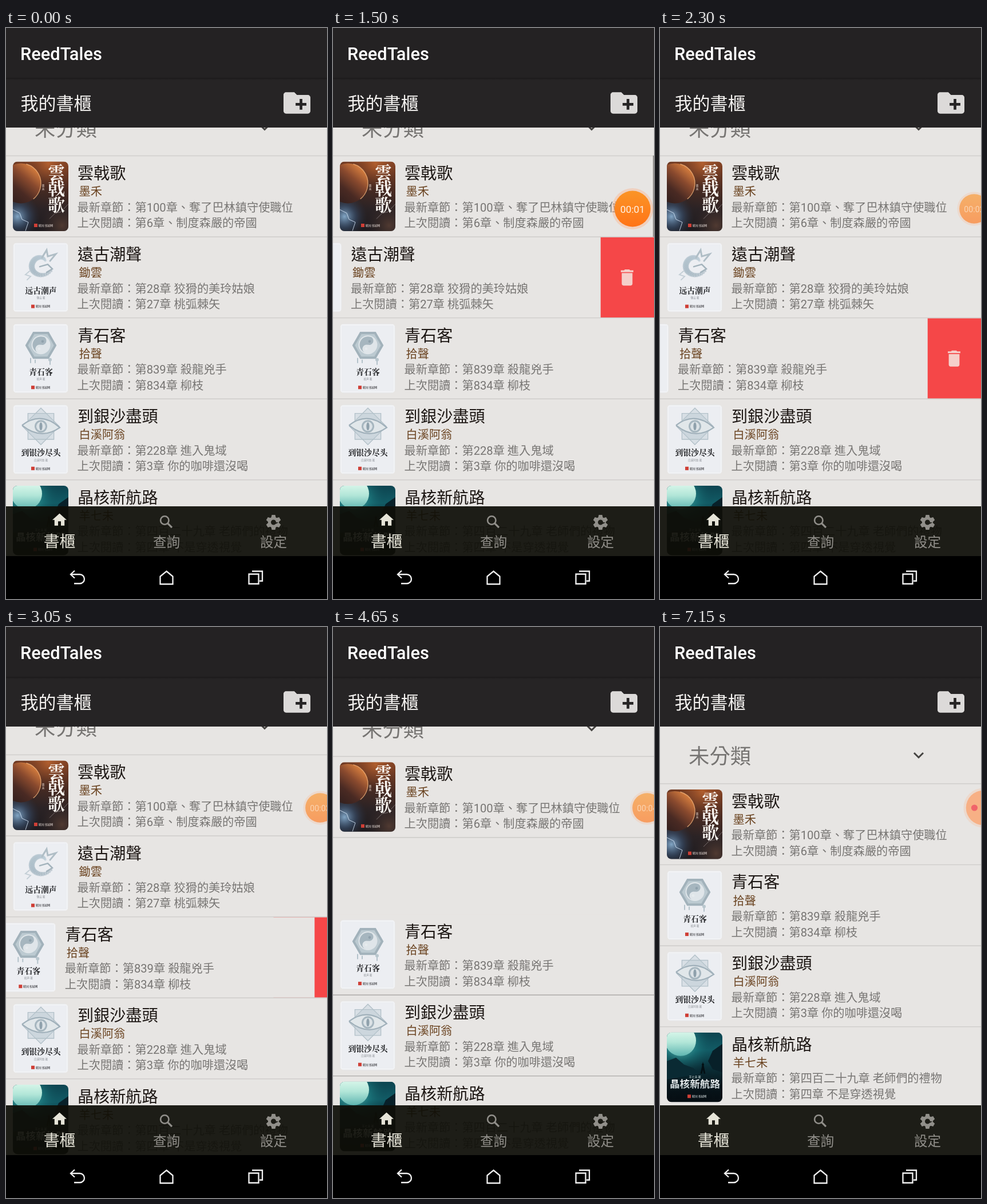
Write an HTML page with a canvas that moves like this. It is 561x998 px and loops after 7600 ms.

```html
<!DOCTYPE html>
<html lang="zh-Hant">
<head>
<meta charset="utf-8">
<title>ReedTales</title>
<style>
html, body { margin: 0; width: 100%; height: 100%; overflow: hidden; background: #000; }
canvas { display: block; width: 100%; height: 100%; }
</style>
</head>
<body>
<canvas id="stage" width="561" height="998"></canvas>
<script>
const ctx = document.getElementById('stage').getContext('2d');
const W = 561, LOOP = 7600, STEP = 50;
const LIST_TOP = 174, TABS_TOP = 836, TABS_END = 923;
const ROW_H = 141.6, OPEN_W = 93.5, SCROLL = 50.5;
const BG = '#e7e5e3', LINE = '#cfcdcb';
const SANS = 'Roboto, "Noto Sans CJK TC", "Noto Sans CJK JP", "Noto Sans CJK SC", sans-serif';
const SERIF = '"Noto Serif CJK SC", "Noto Serif CJK JP", "Noto Sans CJK SC", "Noto Sans CJK JP", serif';

const icons = {
  home: new Path2D('M10 20v-6h4v6h5v-8h3L12 3 2 12h3v8z'),
  trash: new Path2D('M6 19c0 1.1.9 2 2 2h8c1.1 0 2-.9 2-2V7H6zM19 4h-3.5l-1-1h-5l-1 1H5v2h14z'),
  folder: new Path2D('M20 6h-8l-2-2H4c-1.1 0-2 .9-2 2v12c0 1.1.9 2 2 2h16c1.1 0 2-.9 2-2V8c0-1.1-.9-2-2-2z' +
    'm-1 8h-3v3h-2v-3h-3v-2h3V9h2v3h3z')
};

const books = [
  { title: '雲戟歌', author: '墨禾', latest: '第100章、奪了巴林鎮守使職位', last: '第6章、制度森嚴的帝國', cover: planetCover },
  { title: '遠古潮聲', author: '鋤雲', latest: '第28章 狡猾的美玲姑娘', last: '第27章 桃弧棘矢',
    cover: () => paperCover('远古潮声', '锄云 著', swirl) },
  { title: '青石客', author: '拾聲', latest: '第839章 殺龍兇手', last: '第834章 柳枝',
    cover: () => paperCover('青石客', '拾声 著', hexagon) },
  { title: '到銀沙盡頭', author: '白溪阿翁', latest: '第228章 進入鬼域', last: '第3章 你的咖啡還沒喝',
    cover: () => paperCover('到银沙尽头', '白溪阿翁 著', starEye) },
  { title: '晶核新航路', author: '羊七未', latest: '第四百二十九章 老師們的禮物', last: '第四章 不是穿透視覺', cover: moonCover }
];

const ramp = (t, a, b) => Math.min(1, Math.max(0, (t - a) / (b - a)));
const ease = (t, a, b) => (1 - Math.cos(Math.PI * ramp(t, a, b))) / 2;
const mix = (a, b, k) => a + (b - a) * k;

// cy is the optical middle of the glyphs
function text(s, x, cy, size, color, opt = {}) {
  ctx.font = `${opt.weight || 400} ${size}px ${opt.font || SANS}`;
  ctx.textAlign = opt.align || 'left';
  ctx.fillStyle = color;
  ctx.fillText(s, x, cy + size * 0.37);
}
function rect(x, y, w, h, color) {
  ctx.fillStyle = color;
  ctx.fillRect(x, y, w, h);
}
function disc(x, y, r, color) {
  ctx.fillStyle = color;
  ctx.beginPath();
  ctx.arc(x, y, r, 0, 7);
  ctx.fill();
}
function poly(points, close) {
  ctx.beginPath();
  points.forEach(([x, y]) => ctx.lineTo(x, y));
  if (close) ctx.closePath();
}
function shape(points, color) {
  ctx.fillStyle = color;
  poly(points, true);
  ctx.fill();
}
function line(points, color, width, close) {
  ctx.strokeStyle = color;
  ctx.lineWidth = width;
  poly(points, close);
  ctx.stroke();
}
function gradient(stops, x0, y0, x1, y1) {
  const g = ctx.createLinearGradient(x0, y0, x1, y1);
  stops.forEach((c, i) => g.addColorStop(i / (stops.length - 1), c));
  return g;
}
function glow(x, y, r, stops) {
  const g = ctx.createRadialGradient(x, y, 0, x, y, r);
  stops.forEach((c, i) => g.addColorStop(i / (stops.length - 1), c));
  disc(x, y, r, g);
}
function icon(path, x, y, scale, color) {
  ctx.save();
  ctx.translate(x, y);
  ctx.scale(scale, scale);
  ctx.translate(-12, -12);
  ctx.fillStyle = color;
  ctx.fill(path, 'evenodd');
  ctx.restore();
}
function ring(n, r, turn = 0) {
  return Array.from({ length: n }, (_, i) => {
    const a = turn + i * 2 * Math.PI / n;
    return [r * Math.cos(a), r * Math.sin(a)];
  });
}

// Covers: 97 x 121.5, drawn from their top left corner
function badge(x, color) {
  rect(x, 108.5, 6, 6, '#cf3f36');
  text('晴川书屋网', x + 8, 111.5, 5, color, { weight: 700, font: SERIF });
}
function planetCover() {
  rect(0, 0, 97, 122, gradient(['#7d4024', '#4c2c22', '#2b2325', '#1e1b1f'], 60, 0, 40, 122));
  glow(62, 4, 40, ['rgba(200,108,50,.7)', 'rgba(150,76,40,0)']);
  glow(86, 112, 40, ['rgba(110,76,60,.6)', 'rgba(60,44,40,0)']);
  glow(8, 96, 40, ['rgba(140,180,214,.9)', 'rgba(66,100,140,.45)', 'rgba(40,50,70,0)']);
  disc(14, 38, 35, gradient(['#d9803f', '#8a4a2e', '#4a2a23', '#33201e'], 40, 12, -6, 66));
  ctx.strokeStyle = 'rgba(255,190,130,.7)';
  ctx.lineWidth = 1.4;
  ctx.beginPath();
  ctx.arc(14, 38, 35, -1.3, 0.9);
  ctx.stroke();
  line([[0, 84], [12, 90], [16, 101], [27, 106], [22, 121]], 'rgba(220,238,255,.8)', 1);
  line([[97, 74], [84, 88], [74, 90], [64, 100]], 'rgba(200,190,190,.45)', 1);
  [...'雲戟歌'].forEach((c, i) =>
    text(c, 76, 18 + i * 28.5, 30, '#fbf7f2', { weight: 900, font: SERIF, align: 'center' }));
  text('墨', 53, 42, 5, '#e8d8cc', { align: 'center' });
  text('禾', 53, 48, 5, '#e8d8cc', { align: 'center' });
  badge(37, '#d8cdc8');
}
function paperCover(title, author, art) {
  rect(0, 0, 97, 122, '#e5e6e8');
  rect(2, 2, 93, 117.5, '#eceef2');
  ctx.strokeStyle = '#f5f6f8';
  ctx.lineWidth = 1.5;
  ctx.strokeRect(2, 2, 93, 117.5);
  ctx.save();
  ctx.translate(49, 38);
  art();
  ctx.restore();
  text(title, 49, 84, 13.8, '#1f2023', { weight: 900, font: SERIF, align: 'center' });
  text(author, 49, 96.5, 4.6, '#8c9096', { align: 'center' });
  badge(32, '#3c3c40');
}
function swirl() {
  ctx.lineCap = 'round';
  for (let i = 0; i < 26; i++) {
    const k = i / 25, a = 0.6 + k * 5;
    disc(Math.cos(a) * (22 - 12 * k), Math.sin(a) * (19 - 7 * k) + 1, 2 + 3.4 * Math.sin(k * 3.1),
      `rgba(${158 + i},${176 + i},${187 + i},.55)`);
  }
  line([[2, -12], [10, -25], [12, -14], [26, -18], [16, -6]], '#b0bec6', 3);
  line([[-20, 12], [-27, 18], [-18, 21], [-24, 27]], '#c4cfd6', 2);
  line([[-2, 4], [12, 0], [20, 8], [10, 14]], '#a3b3bc', 2.5);
  ctx.lineCap = 'butt';
}
function hexagon() {
  shape(ring(6, 27), '#bccad1');
  line(ring(6, 25), '#a2b2bb', 4, true);
  disc(0, -1, 16.5, '#dfe5e9');
  ctx.fillStyle = '#a6b6bf';
  ctx.beginPath();
  ctx.arc(0, -1, 14.5, 1.9, 1.9 + Math.PI);
  ctx.arc(2.4, -8, 7.2, -1.25, 1.9);
  ctx.arc(-2.4, 6, 7.2, -1.25, 1.9, true);
  ctx.fill();
  disc(3, -7, 2.3, '#8fa1ac');
  disc(-3, 6, 2.3, '#e6ebee');
  [[-19, 22, 9], [-11, 25, 6], [15, 24, 10]].forEach(([x, y, h]) => rect(x, y, 2, h, '#b3c2ca'));
  disc(16, 25, 3, '#b9c7ce');
}
function starEye() {
  for (let i = 0; i < 2; i++) {
    const square = ring(4, 32, i * Math.PI / 4);
    shape(square, 'rgba(186,200,208,.4)');
    line(square, '#b3c1c9', 1.4, true);
  }
  ctx.beginPath();
  ctx.moveTo(-33, -2);
  ctx.quadraticCurveTo(0, -27, 33, 2);
  ctx.quadraticCurveTo(0, 25, -33, -2);
  ctx.fillStyle = '#e1e7ea';
  ctx.strokeStyle = '#a0b0ba';
  ctx.lineWidth = 2.2;
  ctx.fill();
  ctx.stroke();
  disc(0, 0, 11, '#a6b6bf');
  disc(0, 0, 8, '#dbe2e6');
  ctx.fillStyle = '#8fa1ac';
  ctx.beginPath();
  ctx.ellipse(0, 0, 2.6, 7, 0, 0, 7);
  ctx.fill();
}
function moonCover() {
  rect(0, 0, 97, 122, gradient(['#0d4450', '#125c66', '#0b2f38', '#07151b', '#060d12'], 50, 0, 50, 122));
  glow(24, 20, 60, ['rgba(150,240,220,.8)', 'rgba(40,150,150,.35)', 'rgba(10,60,70,0)']);
  disc(24, 14, 27, gradient(['#e4fbef', '#b2e6d8', '#5cb4b0'], 24, -8, 24, 42));
  shape([[97, 20], [80, 32], [72, 50], [80, 64], [97, 70]], '#082029');
  shape([[0, 50], [16, 44], [30, 56], [46, 62], [58, 72], [0, 82]], '#0a2a33');
  line([[60, 72], [63, 58], [66, 72]], '#041015', 3);
  disc(63, 56, 2, '#041015');
  text('羊七未 著', 49, 77, 5, '#d5e6e6', { align: 'center' });
  text('晶核新航路', 49, 89.5, 17.6, gradient(['#ffffff', '#b4c0c4'], 0, 80, 0, 100),
    { weight: 900, align: 'center' });
  badge(36, '#c9d2d4');
}

function drawRow(book, y, shift, alpha, dark) {
  ctx.save();
  ctx.globalAlpha = alpha;
  if (shift > 0) {
    rect(W - OPEN_W, y + 0.8, OPEN_W, ROW_H - 1.4, '#f54748');
    icon(icons.trash, 514, y + 71, 1.56, '#f5cfca');
  }
  rect(-shift, y + 0.8, W, ROW_H - 1.4, BG);
  ctx.save();
  ctx.translate(-shift, y);
  ctx.save();
  ctx.translate(12, 10);
  ctx.beginPath();
  ctx.roundRect(0, 0, 97, 121.5, 8);
  ctx.clip();
  book.cover();
  ctx.restore();
  text(book.title, 125, 30.5, 28.1, '#1c1613');
  text(book.author, 127.5, 62.5, 20.2, '#6a4320');
  text('最新章節：' + book.latest, 124.5, 90, 20.2, '#777573');
  text('上次閱讀：' + book.last, 124.5, 117.5, 20.2, '#777573');
  ctx.restore();
  rect(0, y + ROW_H - 0.8, W, 1.6, dark ? '#b0aeac' : LINE);
  ctx.restore();
}

function drawList(t) {
  const gone = ease(t, 4612, 4862);
  const fade = 1 - ramp(t, 4370, 4600);
  const first = ease(t, 1030, 1450) - ease(t, 1830, 2080) + ease(t, 3120, 3530);
  const second = ease(t, 1960, 2290) - ease(t, 2880, 3130);
  const dy = SCROLL * (gone - 1);
  const moving = gone > 0 && gone < 1;

  ctx.save();
  ctx.beginPath();
  ctx.rect(0, LIST_TOP, W, TABS_END - LIST_TOP);
  ctx.clip();
  rect(0, LIST_TOP, W, TABS_END - LIST_TOP, BG);
  text('未分類', 50, 225.8 + dy, 36.4, '#777573');
  line([[444, 220 + dy], [452, 228 + dy], [460, 220 + dy]], '#454341', 3);
  rect(0, 273.2 + dy, W, 1.6, LINE);
  books.forEach((book, i) => {
    if (i === 1 && fade === 0) return;
    const y = 274 + dy + i * ROW_H - (i > 1 ? ROW_H * gone : 0);
    const shift = i === 1 ? first : i === 2 ? second : 0;
    drawRow(book, y, shift * OPEN_W, i === 1 ? fade : 1, moving && i > 1);
  });
  const bar = ramp(t, 380, 550) * (1 - ramp(t, 1550, 1800));
  rect(559, 223, 2, 142, `rgba(120,118,116,${0.7 * bar})`);
  ctx.restore();
}

function drawHeader() {
  rect(0, 0, W, LIST_TOP, '#262425');
  rect(0, 0, W, 88, '#242223');
  rect(0, 87, W, 4, gradient(['#1b191a', '#262425'], 0, 87, 0, 91));
  text('ReedTales', 25, 44.6, 30.8, '#ffffff', { weight: 500 });
  text('我的書櫃', 25.5, 131.2, 31, '#f3f1ef');
  icon(icons.folder, 508.5, 131, 2.35, '#dcdad9');
}

function drawGear(x, y, color) {
  ctx.save();
  ctx.translate(x, y);
  for (let i = 0; i < 6; i++) {
    shape([[-4.4, -7], [-3, -13], [3, -13], [4.4, -7]], color);
    ctx.rotate(Math.PI / 3);
  }
  ctx.beginPath();
  ctx.arc(0, 0, 9.6, 0, 7);
  ctx.arc(0, 0, 4.5, 0, 7, true);
  ctx.fill('evenodd');
  ctx.restore();
}

function drawTabs() {
  const on = '#e6e4d8', off = '#918f8a';
  rect(0, TABS_TOP, W, TABS_END - TABS_TOP, 'rgba(14,14,8,.93)');
  icon(icons.home, 93.5, 859.7, 1.25, on);
  text('書櫃', 93.5, 897.2, 27.8, on, { align: 'center' });
  ctx.strokeStyle = off;
  ctx.lineWidth = 2.6;
  ctx.beginPath();
  ctx.arc(277.3, 860.5, 7.2, 0, 7);
  ctx.stroke();
  line([[282.5, 865.7], [290, 873.2]], off, 3.2);
  text('查詢', 280.5, 898.4, 23.6, off, { align: 'center' });
  drawGear(467.5, 864, off);
  text('設定', 467.5, 898.4, 23.6, off, { align: 'center' });
}

function drawSystemBar() {
  const c = '#f2f2f2';
  rect(0, TABS_END, W, 75, '#000');
  ctx.strokeStyle = c;
  ctx.lineWidth = 2.3;
  ctx.beginPath();
  ctx.moveTo(113, 955);
  ctx.lineTo(129, 955);
  ctx.arc(129, 963, 8, -Math.PI / 2, Math.PI / 2);
  ctx.lineTo(119, 971);
  ctx.stroke();
  line([[120, 948.5], [113, 955], [120, 961.5]], c, 2.3);
  line([[280.5, 949.5], [291.5, 958.5], [291.5, 972], [269.5, 972], [269.5, 958.5]], c, 2.3, true);
  line([[424.5, 954.5], [441.5, 954.5], [441.5, 971.5], [424.5, 971.5]], c, 2.3, true);
  line([[430, 949.5], [448, 949.5], [448, 966.5], [443, 966.5]], c, 2.3);
}

function drawBubble(t) {
  const show = ramp(t, 0, 100);
  if (!show) return;
  const dock = ease(t, 1580, 1800), tucked = t >= 5750;
  const scale = tucked ? 0.96 : mix(1, 0.82, dock);
  ctx.save();
  ctx.translate(tucked ? 565 : mix(523.5, 549, dock), 316);
  ctx.scale(scale, scale);
  ctx.globalAlpha = show * mix(1, 0.6, dock);
  disc(0, 0, 36, 'rgba(255,170,125,.36)');
  disc(0, 0, 31.5, tucked ? '#ff9656' : gradient(['#fb9426', '#ff7417'], 0, -31, 0, 31));
  if (!tucked) {
    const seconds = [1050, 2050, 3050, 4400, 5450].filter(s => t >= s).length;
    text('00:0' + seconds, 0, 0.5, 17.3, '#fff3e6', { align: 'center' });
  }
  ctx.restore();
  if (!tucked) return;
  if (t >= 7150) return disc(549.5, 316, 5.6, '#f0646a');
  disc(549.5, 316, 5.6, '#f3a08c');
  ctx.strokeStyle = '#e8505c';
  ctx.lineWidth = 1.2;
  for (const r of [1, 3.2, 5.3]) {
    ctx.beginPath();
    ctx.arc(549.5, 316, r, 0, 7);
    ctx.stroke();
  }
}

function frame(now) {
  const t = Math.floor((now % LOOP) / STEP) * STEP;
  drawList(t);
  drawHeader();
  drawTabs();
  drawSystemBar();
  drawBubble(t);
  requestAnimationFrame(frame);
}
requestAnimationFrame(frame);
</script>
</body>
</html>
```
